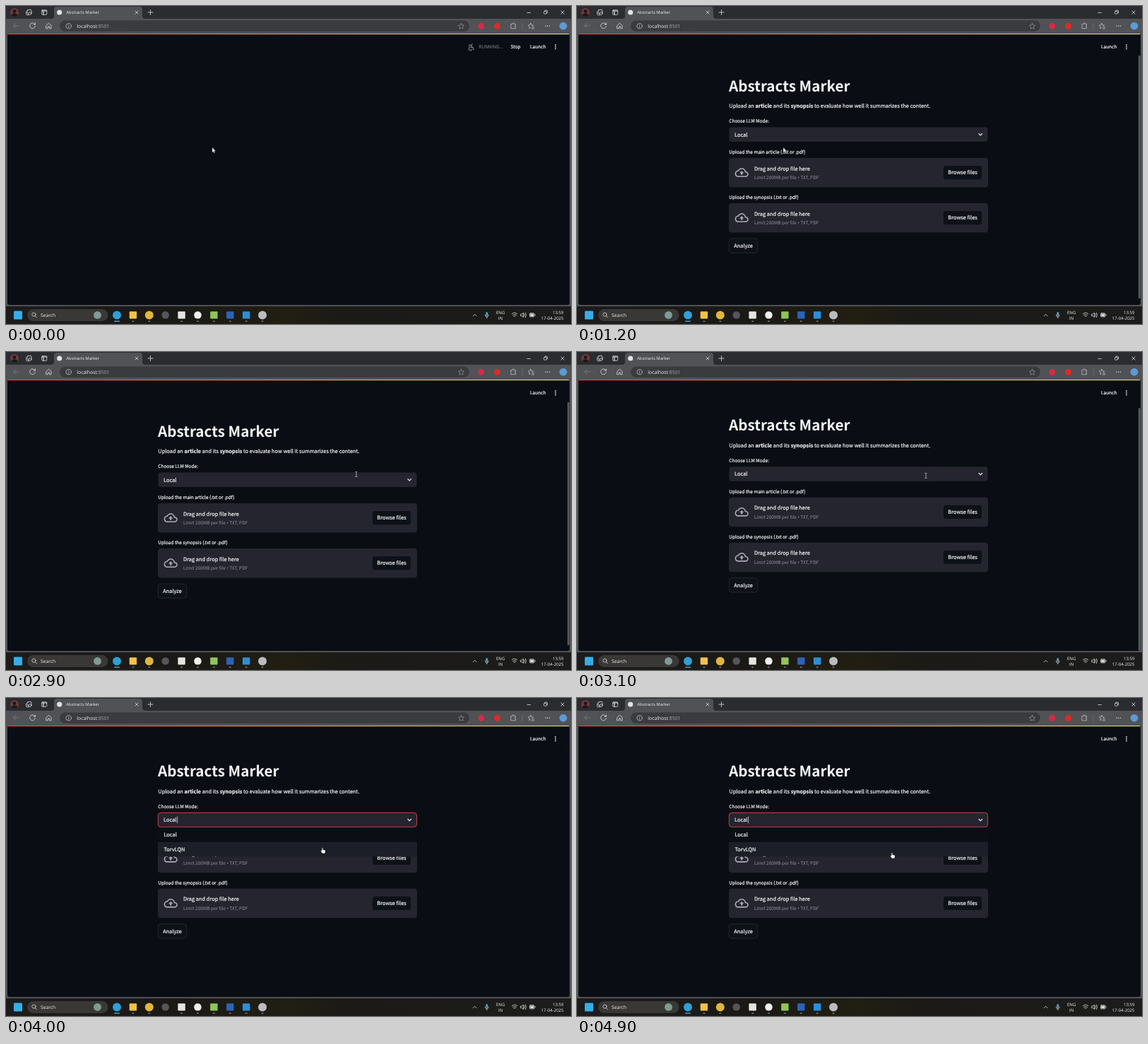
An HTML page for the animation above (5 s loop, 800x450 px).

```html
<!DOCTYPE html>
<html lang="en">
<head>
<meta charset="utf-8">
<title>Abstracts Marker</title>
<style>
  html, body { margin: 0; width: 100%; height: 100%; overflow: hidden; background: #0a0e14; }
  svg { display: block; width: 800px; height: 450px; }
  text { text-rendering: geometricPrecision; white-space: pre; }
  .ui { font-family: "Open Sans", "Noto Sans", sans-serif; font-size: 6.1px; fill: #f0f0f0; }
  .app { font-family: "Noto Sans CJK SC", "Noto Sans CJK JP", "Noto Sans", sans-serif; font-size: 7.43px; fill: #f4f5f7; }
  .small { font-size: 6.53px; }
  .dim { fill: #92949b; }
  .dot { font-family: "Noto Sans", sans-serif; }
  .h1 { font-size: 20.7px; font-weight: 700; }
  .mid { text-anchor: middle; }
  .med { stroke: #f4f5f7; stroke-width: .2; }
  .line { fill: none; stroke: #dedede; stroke-width: .8; stroke-linecap: round; stroke-linejoin: round; }
  .box { fill: #24252e; }
  .btn { fill: #0d1118; stroke: #33353e; stroke-width: .6; }
</style>
</head>
<body>
<svg viewBox="0 0 800 450">
  <defs>
    <linearGradient id="strip">
      <stop stop-color="#d84848"/><stop offset=".5" stop-color="#d69a62"/><stop offset="1" stop-color="#d8d583"/>
    </linearGradient>
    <linearGradient id="bar">
      <stop stop-color="#1c1c1d"/><stop offset=".3" stop-color="#1a1916"/>
      <stop offset=".5" stop-color="#211e12"/><stop offset=".6" stop-color="#1b1a17"/><stop offset="1" stop-color="#1c1c1c"/>
    </linearGradient>
    <clipPath id="view"><rect x="2" y="40" width="796" height="383" rx="3"/></clipPath>
    <clipPath id="face"><circle cx="12" cy="9" r="6"/></clipPath>
    <g id="drop">
      <rect class="box" x="215" y="215" width="367" height="41.5" rx="4"/>
      <path transform="translate(223.6 226) scale(.8)" fill="#a9acb8" d="M19.35 10.04C18.67 6.59 15.64 4 12 4 9.11 4 6.6 5.64 5.35 8.04 2.34 8.36 0 10.91 0 14c0 3.31 2.69 6 6 6h13c2.76 0 5-2.24 5-5 0-2.64-2.05-4.78-4.65-4.96zM19 18H6c-2.21 0-4-1.79-4-4 0-2.05 1.53-3.76 3.56-3.97l1.07-.11.5-.95C8.08 7.14 9.94 6 12 6c2.62 0 4.88 1.86 5.39 4.43l.3 1.5 1.53.11c1.56.1 2.78 1.41 2.78 2.96 0 1.65-1.35 3-3 3zM8 13h2.55v3h2.9v-3H16l-4-4z"/>
      <text class="med" x="251" y="232.8">Drag and drop file here</text>
      <text class="small dim" x="251" y="245.3">Limit 200MB per file <tspan class="dot">•</tspan> TXT, PDF</text>
      <rect class="btn" x="518.3" y="225.5" width="55.4" height="20.4" rx="3.6"/>
      <text class="mid med" x="546" y="238.4">Browse files</text>
    </g>
  </defs>

  <!-- browser frame -->
  <rect width="800" height="425" fill="#515256"/>
  <rect width="800" height="18" fill="#2b2c2f"/>
  <path d="M64 18q4 0 4-4V5q0-4 4-4h117q4 0 4 4v9q0 4 4 4Z" fill="#515256"/>
  <g clip-path="url(#face)">
    <rect x="6" y="3" width="12" height="12" fill="#71383c"/>
    <circle cx="12" cy="7.5" r="2.4" fill="#19191c"/><ellipse cx="12" cy="14.5" rx="4.6" ry="4.3" fill="#19191c"/>
  </g>
  <g class="line">
    <rect x="30" y="5.4" width="6" height="5.6" rx="1.4" transform="rotate(-12 33 8)"/>
    <path d="M28.6 8v3.2q0 1.6 1.6 1.6h2"/><circle cx="34" cy="10.5" r="1.9" fill="#2b2c2f"/>
    <rect x="50.7" y="5.7" width="7" height="6.6" rx="1"/><path d="M50.7 7h7M53 7v5" stroke-width="1.2"/>
    <path d="M183 7l4 4M187 7l-4 4M201 9h7M204.5 5.5v7M738 9.5h4.5M785.8 6.8l4.4 4.4M790.2 6.8l-4.4 4.4"/>
    <rect x="761.6" y="7.4" width="3.8" height="3.8" rx=".8"/><path d="M763 6.2h2.6q1 0 1 1v2.7"/>
    <path d="M18.2 28h-7.5M14 24.6L10.6 28l3.4 3.4" stroke="#7d7e82"/>
    <path d="M41 26a3.9 3.9 0 1 0 .4 2.6M41.4 24v2.3H39"/>
    <path d="M57 27.5l3.5-3.2 3.5 3.2v4.3h-2.4V29h-2.2v2.8H57Z"/>
  </g>
  <circle cx="75.7" cy="9" r="3.6" fill="#e2e2e4"/>
  <text class="ui" x="85.3" y="11.2" style="font-size:5.9px">Abstracts Marker</text>
  <rect x="76" y="20.6" width="580" height="15.4" rx="7.7" fill="#3a3b3f"/>
  <g class="line" style="stroke:#d0d0d2;stroke-width:.7">
    <circle cx="88.6" cy="28.3" r="3.7"/><path d="M88.6 28v2.2M88.6 26.4v.1"/>
    <path stroke="#98999d" d="M644.6 24.4l1.2 2.6 2.9.4-2.1 2 .5 2.8-2.5-1.3-2.5 1.3.5-2.8-2.1-2 2.9-.4Z"/>
    <path d="M715.3 25.6h2q-.3-1.7 1.1-1.7t1.1 1.7h2v2q-1.2-.2-1.2.9t1.2.9v2.4h-6.2Z"/>
    <path d="M731 24v9" stroke="#77787c"/>
    <path d="M743 24.4l1.1 2.4 2.6.4-1.9 1.8M743 24.4l-1.1 2.4-2.6.4 1.9 1.8-.4 2.7 1.6-.9M745 30h2.7M744.3 32h3.4"/>
  </g>
  <g fill="#dedede"><circle cx="764" cy="28.3" r=".7"/><circle cx="766.7" cy="28.3" r=".7"/><circle cx="769.4" cy="28.3" r=".7"/></g>
  <circle cx="672.8" cy="28.5" r="4.4" fill="#d92846"/>
  <circle cx="695.5" cy="28.5" r="4.4" fill="#e02a25"/>
  <circle cx="789" cy="28.3" r="5.4" fill="#5c9bd5"/>
  <text class="ui" x="100.3" y="30.7" style="font-size:6.85px">localhost<tspan fill="#a6a7aa">:8501</tspan></text>

  <!-- page -->
  <rect x="2" y="39" width="796" height="384" rx="3" fill="#0a0e14"/>
  <rect x="3" y="39" width="794" height="1.2" fill="url(#strip)"/>
  <g class="app" clip-path="url(#view)">
    <g id="page">
      <g id="intro">
        <text class="h1" x="215" y="120.6">Abstracts Marker</text>
        <text class="med" x="215.3" y="144.4">Upload an <tspan font-weight="700">article</tspan> and its <tspan font-weight="700">synopsis</tspan> to evaluate how well it summarizes the content.</text>
      </g>
      <g id="bones" fill="#161920"></g>
      <g id="form">
        <text class="small med" x="215.3" y="165.3">Choose LLM Mode:</text>
        <rect id="select" class="box" x="215.4" y="171.6" width="366.2" height="20.4" rx="4"/>
        <text class="med" x="223" y="184.6">Local</text>
        <path id="caret" d="M242.6 177v9.6" stroke="#f2f3f5" stroke-width=".7"/>
        <path class="line" style="stroke-width:1.3" d="M569 180.8l2.3 2.3 2.3-2.3"/>
        <text class="small med" x="215.3" y="209.4">Upload the main article (.txt or .pdf)</text>
        <use href="#drop"/>
        <text class="small med" x="215.3" y="273.4">Upload the synopsis (.txt or .pdf)</text>
        <use href="#drop" y="64"/>
        <rect class="btn" x="215.3" y="329" width="40.4" height="20.4" rx="3.6"/>
        <text class="mid med" x="235.5" y="342">Analyze</text>
      </g>
      <g id="menu">
        <rect x="215" y="192.8" width="367" height="40.4" fill="#0b0f15"/>
        <rect id="hover" x="215" width="367" height="20.4" fill="#1c1f27"/>
        <text class="med" x="223.4" y="205.6">Local</text>
        <text class="med" x="223.4" y="226.4">TorvLQN</text>
      </g>
    </g>
    <g id="busy">
      <path id="sport" class="line" style="stroke:#85878d;stroke-width:1.1"/>
      <text class="small" fill="#85878d" x="669.3" y="60.2">RUNNING...</text>
      <text class="small med" x="714.6" y="60.2">Stop</text>
    </g>
    <text class="small med" x="742" y="60.2">Launch</text>
    <g><circle cx="778" cy="55.2" r=".9"/><circle cx="778" cy="57.9" r=".9"/><circle cx="778" cy="60.6" r=".9"/></g>
    <rect id="thumb" x="795" y="70" width="2.6" height="344" rx="1.2" fill="#5a5c62"/>
  </g>

  <!-- taskbar -->
  <rect y="425" width="800" height="25" fill="url(#bar)"/>
  <rect x="11" y="431.4" width="12" height="12" rx="1" fill="#35aee8"/>
  <rect x="30" y="429" width="114.5" height="17" rx="8.5" fill="#393836"/>
  <g class="line">
    <circle cx="39.4" cy="436.6" r="2.6"/><path d="M41.4 438.6l2 2.2"/>
    <path d="M661.3 438.6l2.4-2.4 2.4 2.4"/>
    <path d="M678.5 437q0 3 2.3 3t2.3-3M680.8 440v1.6"/>
    <path d="M716.4 435.6q3.7-3.2 7.4 0M717.7 437.4q2.4-2 4.8 0M719 439.1q1.1-.9 2.2 0"/>
    <path d="M729 436h1.5l2-1.9v6.4l-2-1.9H729ZM734 435.4q1.2 1.9 0 3.8M735.5 434q2.2 3.3 0 6.6"/>
    <rect x="741.5" y="434.7" width="6.4" height="5.2" rx="1"/><path d="M749 436.4v1.8"/>
  </g>
  <rect x="742.3" y="435.5" width="4.8" height="3.6" fill="#dedede"/>
  <rect x="679.5" y="433" width="2.6" height="5.6" rx="1.3" fill="#5c9fc4"/>
  <circle cx="129.5" cy="437.4" r="5.4" fill="#7f9c94"/>
  <g id="apps"></g>
  <g class="ui">
    <text x="49" y="440" style="font-size:6.7px">Search</text>
    <text class="mid" x="700.2" y="436">ENG</text>
    <text class="mid" x="700.2" y="444">IN</text>
    <text x="789.6" y="436" text-anchor="end">13:59</text>
    <text x="789.6" y="444" text-anchor="end">17-04-2025</text>
  </g>

  <g id="pointer" stroke-linejoin="round">
    <path id="arrow" d="M0 0V7.4L1.7 5.9 2.8 8.3 3.9 7.8 2.8 5.4H5Z" fill="#fff" stroke="#15171b" stroke-width=".4"/>
    <path id="beam" d="M-1.6-3.4h1.2L0-3 .4-3.4h1.2M0-3v6M-1.6 3.4h1.2L0 3l.4.4h1.2" fill="none" stroke="#d8d8da" stroke-width=".7"/>
    <path id="hand" d="M-1.7-4q.8-.6 1.4.2V-1.2l2.6.5q1 .3.9 1.4L2.6 4H-1.1L-3.4.8q.1-1.2 1.4-.5Z" fill="#fff" stroke="#15171b" stroke-width=".4"/>
  </g>
</svg>

<script>
const LOOP = 5000, STEP = 100;
const $ = id => document.getElementById(id);
const show = (id, on) => $(id).setAttribute('display', on ? 'inline' : 'none');
const move = (id, x, y) => $(id).setAttribute('transform', `translate(${x} ${y})`);

function add(parent, tag, attrs) {
  const el = document.createElementNS('http://www.w3.org/2000/svg', tag);
  for (const key in attrs) el.setAttribute(key, attrs[key]);
  $(parent).append(el);
}

for (let i = 0; i < 4; i++)
  add('bones', 'rect', { x: 215.5, y: 157 + i * 31.1, width: 366.5, height: 23, rx: 3.6 });

// colour, corner radius, underline width
const apps = [
  ['#2f9fd6', 6, 8], ['#f1c24b', 1, 3], ['#e0b63c', 6, 3], ['#55565a', 5, 0], ['#e4e5e2', 1, 3],
  ['#f0f0f0', 5, 3], ['#8fc65a', 1, 3], ['#2c63b8', 1, 3], ['#2b8fd8', 1, 3], ['#bcbcc0', 6, 3]
];
apps.forEach(([fill, rx, line], i) => {
  const x = 157 + i * 22.9, r = rx === 6 ? 6 : 5.2;
  add('apps', 'rect', { x: x - r, y: 437.4 - r, width: 2 * r, height: 2 * r, rx, fill });
  if (line) add('apps', 'rect', { x: x - line / 2, y: 445.6, width: line, height: 1.2, rx: .6, fill: i ? '#8d8d8d' : '#52b7e6' });
});

const sports = [
  [0, 'M660.5 53.6h.1M659.6 55.4l-2.8-.4-1.5 1.4M659.6 55.4l-1.4 3h3l1 3.4M657 58a2.5 2.5 0 1 0 3 3.3'],
  [400, 'M660.2 53.4h.1M659.4 55.2l-1.2 3.2 2.4 1.3-.5 2.6M658.2 58.4l-1 2.2h-2.3M656 56.6l3.4-1.4 1.2 1.8h1.8'],
  [600, 'M658.8 53.4h.1M658.6 55.4l.2 3.2 2.6 3.5M658.8 58.6l-2.6 3.5M655 57.4l3.6-2 3.8 1.4']
];

// time, x, y of the pointer
const path = [
  [0, 292, 200], [1900, 292, 200], [2000, 292, 204], [2200, 322, 198], [2500, 425, 182],
  [2800, 493, 173], [2900, 496, 173], [3100, 494, 175], [3700, 492, 175],
  [3800, 485, 183], [3900, 464, 202], [4000, 449, 216], [4200, 448, 218],
  [4300, 448, 218], [4900, 447, 223], [5000, 447, 223]
];
const scroll = [[0, 0], [2800, 0], [2900, 1], [3000, 5.5], [3100, 9.3], [5000, 9.3]];

function at(table, t) {
  const i = Math.max(1, table.findIndex(row => row[0] >= t));
  const a = table[i - 1], b = table[i], k = (t - a[0]) / (b[0] - a[0]);
  return a.slice(1).map((v, n) => v + (b[n + 1] - v) * k);
}

const READY = 900, LOADED = 1000, FOCUS = 3700, OPEN = 3800;

function draw(t) {
  const loaded = t >= LOADED, focus = t >= FOCUS, open = t >= OPEN;
  const [x, y] = at(path, t), [top] = at(scroll, t);

  show('busy', t < READY);
  $('sport').setAttribute('d', sports.filter(s => s[0] <= t).pop()[1]);
  show('intro', t >= READY);
  show('bones', t >= READY && !loaded);
  show('form', loaded);
  show('thumb', loaded && !open);
  move('page', loaded ? 0 : 1.5, -top);
  move('thumb', 0, top);

  $('select').setAttribute('stroke', focus ? '#c8434a' : 'none');
  show('caret', focus && (t - FOCUS) % 1000 < 500);
  show('menu', open);
  $('hover').setAttribute('y', y > 204 ? 213.2 : 192.8);

  const kind = open ? 'hand' : loaded && t > 2200 && y < 192 ? 'beam' : 'arrow';
  for (const id of ['arrow', 'beam', 'hand']) show(id, id === kind);
  move('pointer', x, y);
}

function tick() {
  draw(Math.floor(performance.now() % LOOP / STEP) * STEP);
  requestAnimationFrame(tick);
}
tick();
</script>
</body>
</html>
```
